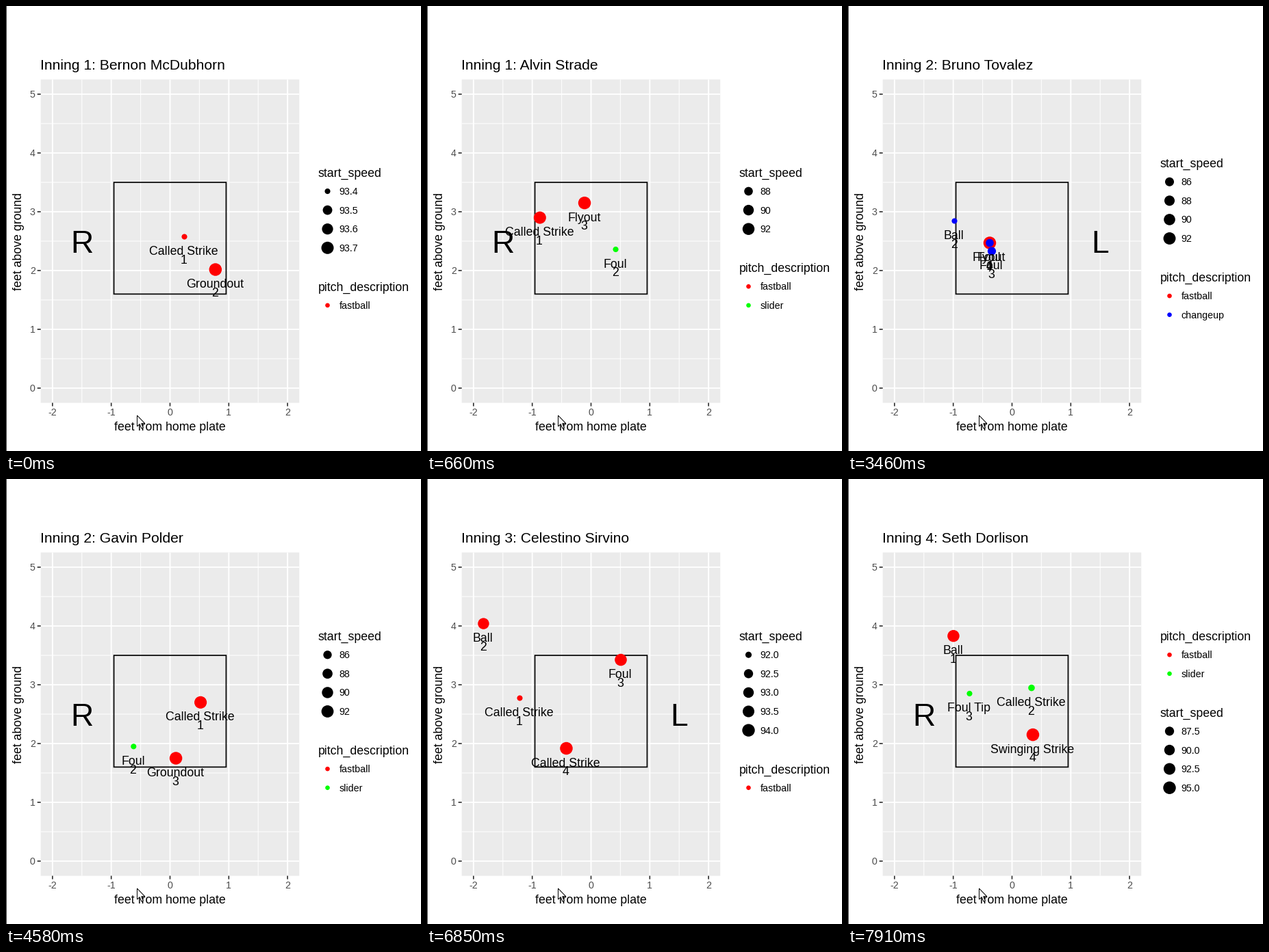
Recreate the animation shown at these times as a matplotlib script. Size 606x651 px, loop 8 s.

```python
import math

import matplotlib.pyplot as plt
from matplotlib.animation import FuncAnimation
from matplotlib.collections import LineCollection
from matplotlib.patches import Circle, Polygon, Rectangle

WIDTH, HEIGHT, DPI = 606, 651, 64
LOOP, INTERVAL = 8000, 20
PT = 72 / DPI

TITLE, BODY, SMALL, HAND = 21.15, 17.8, 14.2, 46.2
LEGEND_MID, ROW, TITLE_GAP, GROUP_GAP = 341.2, 27.6, 26.5, 57.6
COLORS = {"fastball": "#ff0000", "slider": "#00ff00", "changeup": "#0000ff"}

# start ms, title, batter side, speed range, speed breaks,
# pitches (x ft, y ft, type, speed, result)
SCENES = [
    (0, "Inning 1: Bernon McDubhorn", "R", (93.4, 93.73),
     ["93.4", "93.5", "93.6", "93.7"],
     [(.245, 2.575, "fastball", 93.4, "Called Strike"),
      (.773, 2.017, "fastball", 93.73, "Groundout")]),
    (660, "Inning 1: Alvin Strade", "R", (86.8, 93.2),
     ["88", "90", "92"],
     [(-.87, 2.9, "fastball", 92.6, "Called Strike"),
      (.42, 2.36, "slider", 86.8, "Foul"),
      (-.11, 3.15, "fastball", 93.2, "Flyout")]),
    (1930, "Inning 2: Celestino Bardelfi", "R", (84.8, 93.3),
     ["85", "87", "89", "91", "93"],
     [(.955, 2.02, "slider", 84.8, "Foul"),
      (1.345, 2.48, "fastball", 92.4, "Ball"),
      (-.235, 1.376, "fastball", 93.3, "Lineout")]),
    (3460, "Inning 2: Bruno Tovalez", "L", (84, 93),
     ["86", "88", "90", "92"],
     [(-.379, 2.47, "fastball", 93, "Foul"),
      (-.979, 2.843, "changeup", 84, "Ball"),
      (-.344, 2.33, "changeup", 85.4, "Foul"),
      (-.379, 2.47, "changeup", 85, "Flyout")]),
    (4580, "Inning 2: Gavin Polder", "R", (84.6, 93.1),
     ["86", "88", "90", "92"],
     [(.52, 2.7, "fastball", 92.5, "Called Strike"),
      (-.62, 1.95, "slider", 84.6, "Foul"),
      (.1, 1.75, "fastball", 93.1, "Groundout")]),
    (5520, "Inning 3: Torby Kelder", "R", (92.1, 93.1),
     ["92.6"],
     [(-.658, 3.19, "fastball", 92.6, "Flyout")]),
    (6850, "Inning 3: Celestino Sirvino", "L", (91.98, 94.05),
     ["92.0", "92.5", "93.0", "93.5", "94.0"],
     [(-1.212, 2.773, "fastball", 91.98, "Called Strike"),
      (-1.83, 4.04, "fastball", 93.3, "Ball"),
      (.507, 3.424, "fastball", 93.7, "Foul"),
      (-.42, 1.918, "fastball", 94.05, "Called Strike")]),
    (7910, "Inning 4: Seth Dorlison", "R", (85, 95.1),
     ["87.5", "90.0", "92.5", "95.0"],
     [(-.997, 3.83, "fastball", 93.2, "Ball"),
      (.332, 2.947, "slider", 85.2, "Called Strike"),
      (-.723, 2.85, "slider", 85, "Foul Tip"),
      (.355, 2.15, "fastball", 95.1, "Swinging Strike")]),
]
TYPES_FIRST = {7910}

plt.rcParams["font.family"] = "Liberation Sans"
fig = plt.figure(figsize=(WIDTH / DPI, HEIGHT / DPI), dpi=DPI, facecolor="white")
ax = fig.add_axes([0, 0, 1, 1])
ax.set_xlim(0, WIDTH)
ax.set_ylim(HEIGHT, 0)
ax.axis("off")


def px(feet):
    return 239.5 + 85.8 * feet


def py(feet):
    return 559 - 86 * feet


def write(x, baseline, text, size, ha="left", color="black", z=6, **extra):
    return ax.text(x, baseline, text, fontsize=size * PT, ha=ha, va="baseline",
                   color=color, zorder=z, **extra)


def write_mid(x, y, text, size, **extra):
    return write(x, y + .358 * size, text, size, **extra)


def dot(x, y, diameter, color):
    return ax.add_patch(Circle((x, y), diameter / 2, fc=color, lw=0, zorder=5))


def box(left, top, right, bottom, **style):
    ax.add_patch(Rectangle((left, top), right - left, bottom - top, snap=False, **style))


def lines(segments, width, color, z):
    ax.add_collection(LineCollection(segments, linewidths=width * PT, colors=color,
                                     capstyle="butt", snap=False, zorder=z))


def diameter(speed, limits):
    low, high = limits
    return 8.1 + 10.4 * math.sqrt(max(0, (speed - low) / (high - low)))


def draw_background():
    left, right, top, bottom = px(-2.2), px(2.2), py(5.25), py(-.25)
    box(left, top, right, bottom, fc="#ebebeb", lw=0, zorder=0)

    def grid(xs, ys):
        return ([[(px(x), top), (px(x), bottom)] for x in xs]
                + [[(left, py(y)), (right, py(y))] for y in ys])

    lines(grid([-1.5, -.5, .5, 1.5], [.5, 1.5, 2.5, 3.5, 4.5]), 1, "white", 1)
    lines(grid(range(-2, 3), range(6)), 1.9, "white", 2)
    ticks = ([[(px(x), bottom), (px(x), bottom + 5)] for x in range(-2, 3)]
             + [[(left - 5, py(y)), (left, py(y))] for y in range(6)])
    lines(ticks, 1.7, "#333333", 2)
    for x in range(-2, 3):
        write_mid(px(x), 594, str(x), SMALL, ha="center", color="#4d4d4d")
    for y in range(6):
        write_mid(42.8, py(y), str(y), SMALL, ha="right", color="#4d4d4d")

    write(239.5, 621, "feet from home plate", BODY, ha="center")
    write(23, 344, "feet above ground", BODY, ha="center",
          rotation=90, rotation_mode="anchor")
    box(px(-.955), py(3.5), px(.955), py(1.6),
        fc="none", ec="black", lw=1.7 * PT, zorder=4)
    box(0, 0, 1, HEIGHT, fc="#404040", lw=0, zorder=2)

    pointer = [(0, 0), (0, 16), (3.7, 12.6), (6.4, 19), (8.8, 18), (6.2, 11.7), (11.3, 11.7)]
    ax.add_patch(Polygon([(191.5 + x, 599 + y) for x, y in pointer], fc="white",
                         ec="black", lw=PT, joinstyle="miter", zorder=9))


def draw_legend(groups):
    rows = sum(len(keys) for _, keys in groups)
    total = 2 * TITLE_GAP + GROUP_GAP + ROW * (rows - 2)
    y = LEGEND_MID - total / 2
    artists = []
    for title, keys in groups:
        artists.append(write(455.5, y + 5.3, title, BODY))
        y += TITLE_GAP
        for label, size, color in keys:
            artists.append(dot(469.5, y, size, color))
            artists.append(write_mid(486.5, y, label, SMALL))
            y += ROW
        y += GROUP_GAP - ROW
    return artists


def draw_scene(start, title, side, limits, breaks, pitches):
    artists = [write(50.5, 93, title, TITLE),
               write_mid(px(-1.5 if side == "R" else 1.5), py(2.5), side, HAND, ha="center")]
    for number, (x, y, kind, speed, result) in enumerate(pitches, 1):
        cx, cy = px(x), py(y)
        artists += [dot(cx, cy, diameter(speed, limits), COLORS[kind]),
                    write_mid(cx - .8, cy + 20.2, result, BODY, ha="center"),
                    write_mid(cx - .8, cy + 33, str(number), BODY, ha="center")]

    used = {pitch[2] for pitch in pitches}
    groups = [
        ("start_speed", [(b, diameter(float(b), limits), "black") for b in breaks]),
        ("pitch_description", [(k, 6.6, c) for k, c in COLORS.items() if k in used]),
    ]
    if start in TYPES_FIRST:
        groups.reverse()
    return artists + draw_legend(groups)


draw_background()
scene_artists = [draw_scene(*scene) for scene in SCENES]


def update(frame):
    end = (frame + 1) * INTERVAL
    current = max(i for i, scene in enumerate(SCENES) if scene[0] < end)
    for i, artists in enumerate(scene_artists):
        for artist in artists:
            artist.set_visible(i == current)
    return scene_artists[current]


animation = FuncAnimation(fig, update, frames=LOOP // INTERVAL, interval=INTERVAL,
                          repeat=True, repeat_delay=0, blit=False)
plt.show()
```
